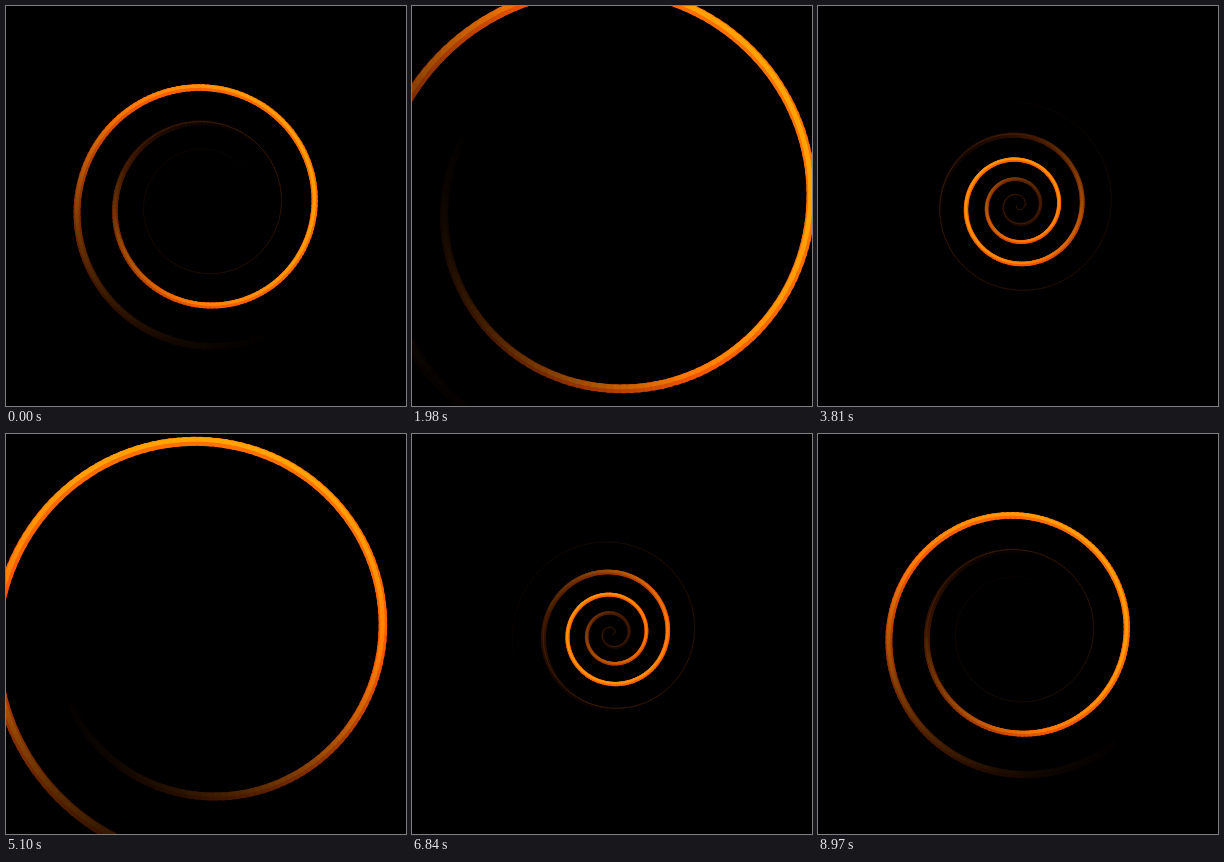
Recreate the animation shown at these times as an HTML page with a canvas. Size 400 by 400 pixels, loop 9000 ms.

```html
<!DOCTYPE html>
<html lang="en">
<head>
<meta charset="utf-8">
<title>Spiral light</title>
<style>
  html, body { margin: 0; width: 100%; height: 100%; overflow: hidden; background: #000; }
  canvas { display: block; width: 400px; height: 400px; }
</style>
</head>
<body>
<canvas id="stage" width="400" height="400"></canvas>
<script>
const ctx = document.getElementById('stage').getContext('2d');
const LOOP = 9000, STEP = 30;
const TURNS = 8.3, DEPTH = 11.84, SCALE = 150.8;
const GAP = 62.4;            // distance between two lights along the spiral
const SEG = 1 / 150;         // segment length in turns

// Conical spiral in perspective: n counts turns from the tip.
function point(n, topTurn) {
  const r = SCALE * n / (DEPTH - n);
  const a = 2 * Math.PI * (n - topTurn);
  return [200 - r * Math.sin(a), 200 - r * Math.cos(a)];
}

// Signed distance along the spiral to the nearest light.
function lightOffset(n, centre) {
  const d = n * n - centre + GAP / 2;
  return d - Math.floor(d / GAP) * GAP - GAP / 2;
}

function shade(level, red, green) {
  const r = Math.min(255, Math.round(red * level));
  const g = Math.min(255, Math.round(green * level));
  return `rgb(${r},${g},0)`;
}

function line(p, q, dx, dy, width, color) {
  ctx.lineWidth = width;
  ctx.strokeStyle = color;
  ctx.beginPath();
  ctx.moveTo(p[0] + dx, p[1] + dy);
  ctx.lineTo(q[0] + dx, q[1] + dy);
  ctx.stroke();
}

function draw(time) {
  const topTurn = 5.205 - time / LOOP;
  const centre = 25 - GAP * time / 3000;
  ctx.fillStyle = '#000';
  ctx.fillRect(0, 0, 400, 400);

  const parts = [];
  for (let n = 0.06; n < TURNS; n += SEG) {
    const d = Math.abs(lightOffset(n, centre));
    const glow = Math.exp(-Math.pow(d / 5, 3)) * (0.82 + 0.026 * n);
    // The thin glint fades out towards the wide end.
    const rim = 0.3 * Math.exp(-Math.pow(d / 9.5, 2)) * Math.min(1, Math.max(0, 5.5 - n));
    if (glow < 0.012 && rim < 0.02) continue;
    parts.push({
      p: point(n, topTurn), q: point(n + SEG * 1.6, topTurn),
      width: 58 / (DEPTH - n) - 2.2, glow, rim
    });
  }
  for (const s of parts) {
    if (s.glow > 0.012) line(s.p, s.q, 0, 0, s.width, shade(s.glow, 325, 114));
  }
  for (const s of parts) {
    const dx = -0.05 * s.width, dy = -0.22 * s.width;
    if (s.glow > s.rim) line(s.p, s.q, dx, dy, s.width * 0.5, shade(s.glow, 340, 165));
    else if (s.rim > 0.02) line(s.p, s.q, dx, dy, 1, shade(s.rim, 340, 150));
  }
}

const start = performance.now();
function tick() {
  const t = (performance.now() - start) % LOOP;
  draw(Math.floor(t / STEP) * STEP);
  requestAnimationFrame(tick);
}
tick();
</script>
</body>
</html>
```
